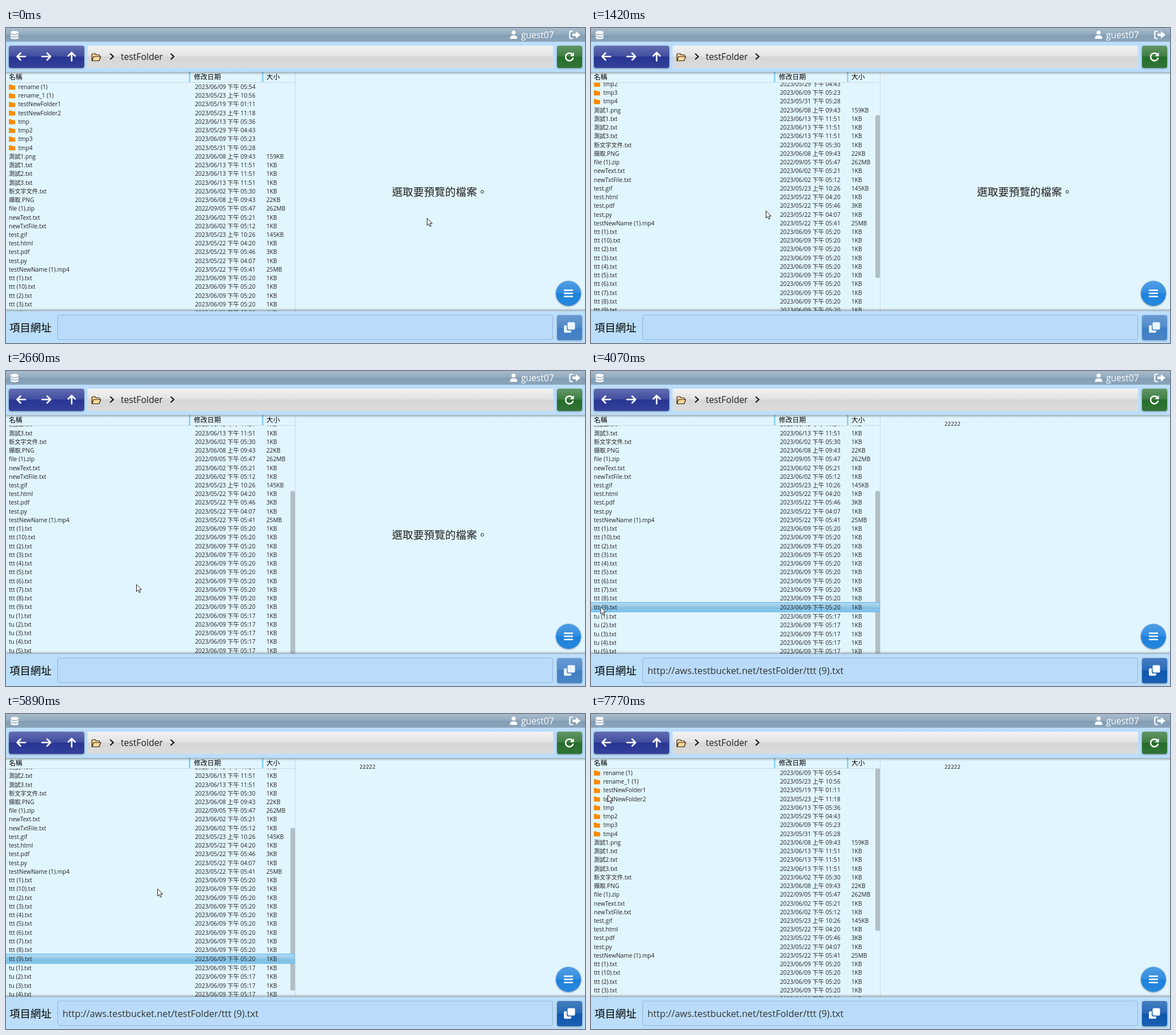
Write an HTML page that moves like this. It is 1014x552 px and loops after 8 s.

```html
<!DOCTYPE html>
<html lang="zh-Hant">
<head>
<meta charset="utf-8">
<title>File browser</title>
<style>
  html, body { margin: 0; width: 100%; height: 100%; overflow: hidden; background: #e1f5fe; }
  svg { display: block; width: 1014px; height: 552px; }
  text { font-family: "Open Sans", "Noto Sans CJK TC", "Noto Sans CJK", sans-serif; fill: #222; white-space: pre; }
  #rows { font-size: 10.2px; }
  .head { font-size: 11.8px; fill: #000; }
  .line { fill: none; stroke: #fff; stroke-linecap: round; stroke-linejoin: round; }
  .raised { filter: drop-shadow(0 1px 1.5px #0006); }
</style>
</head>
<body>
<svg viewBox="0 0 1014 552">
  <defs id="glosses"></defs>
  <defs>
    <linearGradient id="shade" x2="0" y2="1"><stop stop-opacity=".3"/><stop offset="1" stop-opacity="0"/></linearGradient>
    <clipPath id="view"><path d="M0 95.5H506V496H0Z"/></clipPath>
    <path id="folder" d="M0 1Q0 0 1 0H4L5.5 1.5H9.5Q11 1.5 11 3V8Q11 9 10 9H1Q0 9 0 8Z" fill="#fb8c00"/>
  </defs>

  <rect width="1014" height="552" fill="#e1f5fe"/>
  <g clip-path="url(#view)">
    <rect id="thumb" x="498" width="8" rx="3" fill="#b0bec5"/>
    <g id="rows"></g>
  </g>
  <path d="M0 95.5H506.5M506.5 77V496" fill="none" stroke="#ccd8df"/>
  <path d="M321.5 77V95M449.5 77V95" stroke="#81d0f7" stroke-width="2.5"/>
  <text class="head" x="5" y="90">名稱</text>
  <text class="head" x="329" y="90">修改日期</text>
  <text class="head" x="456" y="90">大小</text>
  <text id="prompt" x="676" y="293.5" font-size="18.6" font-weight="300">選取要預覽的檔案。</text>
  <text id="preview" x="619" y="96" style="font:9.3px 'DejaVu Sans Mono',monospace">22222</text>

  <rect y="24" width="1014" height="53" fill="#bbdefb"/>
  <rect y="77" width="1014" height="5" fill="url(#shade)"/>
  <rect width="1014" height="24" fill="url(#bar)"/>
  <g fill="#fff">
    <path d="M8 7.5C8 4 22 4 22 7.5V8.6C22 11.6 8 11.6 8 8.6ZM8 10.8Q15 14 22 10.8V12.9C22 15.8 8 15.8 8 12.9ZM8 15Q15 18.2 22 15V17C22 20.4 8 20.4 8 17Z"/>
    <circle cx="889" cy="8" r="3.6"/>
    <path d="M882.5 19Q882.5 13 887 13H891Q895.5 13 895.5 19Z"/>
    <text x="902" y="18" font-size="15.6" style="fill:#fff">guest07</text>
    <path d="M992 9.8H998V5.5L1006 12 998 18.5V14.3H992Z"/>
  </g>
  <path class="line" d="M992 5.5H989.5Q987.3 5.5 987.3 8V16Q987.3 18.5 989.5 18.5H992" stroke-width="2.2"/>

  <rect class="raised" x="5" y="31" width="132" height="39" rx="4" fill="url(#indigo)"/>
  <path class="line" stroke-width="2.7" d="M34 50H19.5M25.5 44L19.5 50 25.5 56M63 50H78M72 44L78 50 72 56M115 57.5V43M109 49L115 43 121 49"/>
  <rect x="143" y="31" width="815" height="39" fill="url(#grey)"/>
  <path d="M150.5 57V46.5Q150.5 45 152 45H156L158 47H162.5Q164 47 164 48.5V50H166L163 57.5H150.5L153.5 50H164" fill="#ffd899" stroke="#2a2112" stroke-width="1.2" stroke-linejoin="round"/>
  <path class="line" style="stroke:#111" stroke-width="2.1" d="M183 45.5L188 50 183 54.5M289 45.5L294 50 289 54.5"/>
  <text x="201" y="56" font-size="15.7">testFolder</text>
  <rect class="raised" x="965" y="31" width="44" height="39" rx="4" fill="url(#green)"/>
  <path class="line" stroke-width="2.6" d="M992 46.5A6.7 6.7 0 1 0 993 53"/>
  <path d="M994.5 42.5V49.5H987.5Z" fill="#fff"/>

  <circle class="raised" cx="985" cy="465" r="22" fill="url(#sky)"/>
  <path class="line" stroke-width="2.5" d="M978 459.5H992M978 465H992M978 470.5H992"/>

  <rect y="-496" width="1014" height="5" fill="url(#shade)" transform="scale(1 -1)"/>
  <rect y="496" width="1014" height="56" fill="#bbdefb"/>
  <text x="6" y="531.5" font-size="18.4" font-weight="500" style="fill:#000">項目網址</text>
  <rect x="90.5" y="503" width="867" height="43" rx="3" fill="#badcfa" stroke="#8fb4d6"/>
  <text id="url" x="99" y="530.5" font-size="16.3" style="fill:#333">http://aws.testbucket.net/testFolder/ttt (9).txt</text>
  <g id="copy">
    <rect class="raised" x="965" y="503" width="44" height="44" rx="4" fill="url(#blue)"/>
    <path d="M982 521H979Q977 521 977 523V532Q977 534 979 534H988Q990 534 990 532V530H985Q982 530 982 527Z" fill="#fff"/>
    <rect x="983.5" y="515.5" width="13" height="13" rx="2" fill="#fff"/>
  </g>
  <path id="cursor" d="M.5 .5V13L3.4 10.3 5.4 15 7.5 14.1 5.5 9.5H9.4Z" fill="#fff" stroke="#222"/>
</svg>
<script>
const $ = id => document.getElementById(id);
const ROW = 15.24, TOP = 95.4, VIEW = 401, PICKED = 31, GROW = 1.5;
const LOOP = 8000, FRAME = 66, PICK_AT = 3800, LOAD_AT = 3890, PREVIEW_AT = 4060;

// Glossy fills: a lightened upper half above a plain lower half
const gloss = (id, color, light) => {
  const stop = (offset, part) =>
    `<stop offset="${offset}" style="stop-color:color-mix(in srgb, white ${light * part}%, ${color})"/>`;
  return `<linearGradient id="${id}" x2="0" y2="1">${stop(0, 1)}${stop(.49, .4)}${stop(.5, 0)}${stop(1, .2)}</linearGradient>`;
};
$('glosses').innerHTML = gloss('bar', '#839eb5', 30) + gloss('indigo', '#283593', 28) + gloss('grey', '#d6d6d6', 70)
  + gloss('green', '#256d2a', 28) + gloss('blue', '#0d57ae', 24) + gloss('sky', '#1c81dc', 23) + gloss('picked', '#80c0e6', 42);

const files = `rename (1)|2023/06/09 下午 05:54
rename_1 (1)|2023/05/23 上午 10:56
testNewFolder1|2023/05/19 下午 01:11
testNewFolder2|2023/05/23 上午 11:18
tmp|2023/06/13 下午 05:36
tmp2|2023/05/29 下午 04:43
tmp3|2023/06/09 下午 05:23
tmp4|2023/05/31 下午 05:28
測試1.png|2023/06/08 上午 09:43|159KB
測試1.txt|2023/06/13 下午 11:51|1KB
測試2.txt|2023/06/13 下午 11:51|1KB
測試3.txt|2023/06/13 下午 11:51|1KB
新文字文件.txt|2023/06/02 下午 05:30|1KB
擷取.PNG|2023/06/08 上午 09:43|22KB
file (1).zip|2022/09/05 下午 05:47|262MB
newText.txt|2023/06/02 下午 05:21|1KB
newTxtFile.txt|2023/06/02 下午 05:12|1KB
test.gif|2023/05/23 上午 10:26|145KB
test.html|2023/05/22 下午 04:20|1KB
test.pdf|2023/05/22 下午 05:46|3KB
test.py|2023/05/22 下午 04:07|1KB
testNewName (1).mp4|2023/05/22 下午 05:41|25MB`.split('\n').map(s => s.split('|'));
const series = (name, count, date) => Array.from({ length: count }, (_, i) => [`${name} (${i + 1}).txt`, date, '1KB']).sort();
files.push(...series('ttt', 10, '2023/06/09 下午 05:20'), ...series('tu', 5, '2023/06/09 下午 05:17'));

$('rows').innerHTML = files.map(([name, date, size], i) => `<g>
  ${i === PICKED ? '<rect id="mark" x="-1" y="-1" width="507" height="16.5" fill="url(#picked)" stroke="#55b0e6"/>' : ''}
  ${size ? '' : '<use href="#folder" x="5" y="3.5"/>'}
  <text x="${size ? 5 : 21.5}" y="11.5">${name}</text>
  <text x="331" y="11.5">${date}</text>
  <text x="456" y="11.5">${size || ''}</text></g>`).join('');
const rows = [...$('rows').children];

// Moves: start, end, destination
const pointerMoves = [
  [530, 1070, 306, 320], [2200, 2220, 304, 321], [2330, 2460, 228, 373.5],
  [2660, 3000, 60, 420], [3000, 3270, 16.5, 413],
  [4800, 5200, 754, 102], [5200, 5400, 666, 118], [5400, 5540, 504, 215],
  [5560, 5740, 265, 306], [7100, 7770, 29, 141.5]];
const scrollMoves = [[1090, 1270, 76], [1393, 1550, 152], [1720, 1960, 162], [5825, 6150, 0]];

// Eases from each destination to the next, holding every pose for one FRAME
function follow(origin, moves, t) {
  return moves.reduce((from, [start, end, ...to]) => {
    const held = end - Math.ceil((end - t) / FRAME) * FRAME;
    const p = Math.min(1, Math.max(0, (held - start) / (end - start)));
    return from.map((v, i) => v + (to[i] - v) * p * p * (3 - 2 * p));
  }, origin);
}

const show = (id, on) => $(id).style.visibility = on ? 'visible' : 'hidden';

function draw(now) {
  const t = now % LOOP, loaded = t >= LOAD_AT, picked = t >= PICK_AT;
  const [x, y] = follow([737, 333], pointerMoves, t);
  const [scroll] = follow([0], scrollMoves, t);
  rows.forEach((row, i) => {
    const extra = picked ? GROW * (Math.sign(i - PICKED) + 1) / 2 : 0;
    row.setAttribute('transform', `translate(0 ${TOP + ROW * i + extra - scroll})`);
  });
  const total = ROW * files.length;
  $('thumb').setAttribute('y', 95 + scroll * VIEW / total);
  $('thumb').setAttribute('height', VIEW * VIEW / total);
  show('thumb', x < 507);
  show('mark', picked);
  show('prompt', !loaded);
  show('url', loaded);
  show('preview', t >= PREVIEW_AT);
  $('copy').style.opacity = loaded ? 1 : .7;
  $('cursor').setAttribute('transform', `translate(${x} ${y})`);
  requestAnimationFrame(draw);
}
requestAnimationFrame(draw);
</script>
</body>
</html>
```
